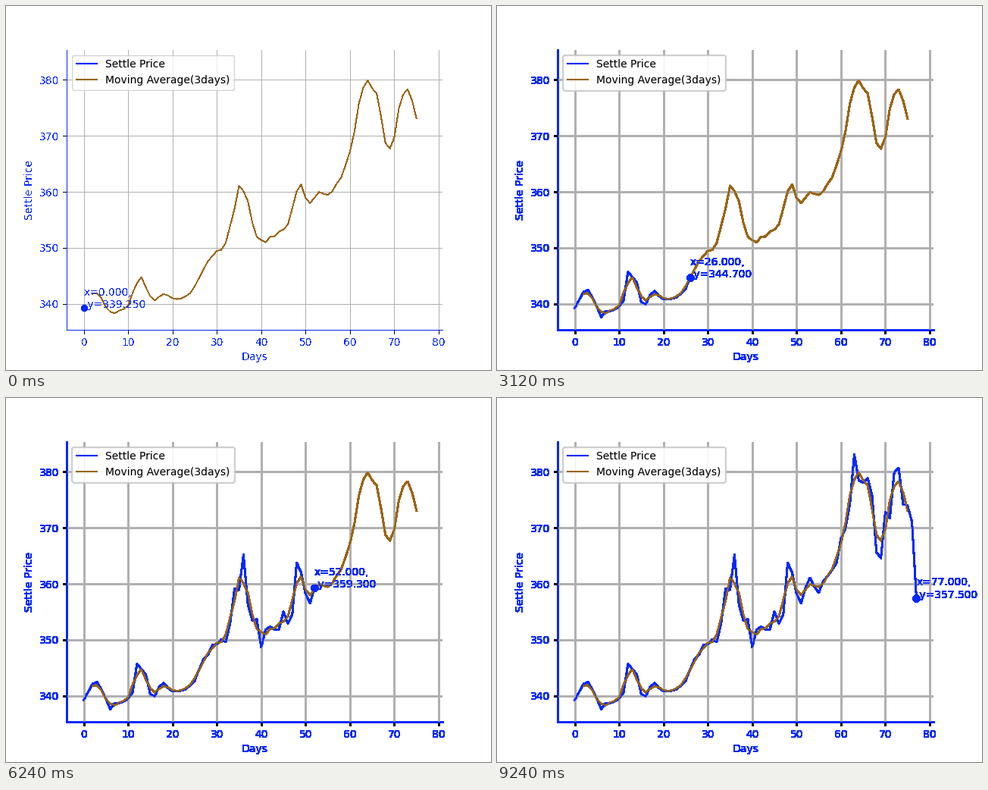
Recreate the animation shown at these times as a matplotlib script. Size 640 by 480 pixels, loop 9.36 s.

```python
import numpy as np
import matplotlib.pyplot as plt
from matplotlib.animation import FuncAnimation

BLUE = "#0028ff"
BROWN = "#996515"

price = np.array([
    339.25, 340.7, 342.15, 342.5, 341.1, 339.45, 337.62, 338.7, 338.7, 339.0,
    339.5, 340.6, 345.7, 344.8, 343.8, 340.3, 339.9, 341.6, 342.3, 341.4,
    340.8, 340.8, 340.95, 341.2, 341.9, 342.7, 344.7, 346.5, 347.3, 349.1,
    349.2, 350.1, 349.6, 353.0, 359.2, 358.92, 365.2, 356.3, 353.5, 353.7,
    348.7, 351.8, 352.4, 351.8, 351.9, 355.04, 352.9, 354.5, 363.8, 362.0,
    358.2, 356.5, 359.3, 361.1, 359.5, 358.4, 360.5, 361.4, 362.5, 363.74,
    368.1, 369.9, 374.2, 383.15, 378.5, 378.1, 378.9, 375.9, 365.66, 364.6,
    372.9, 371.7, 379.9, 380.7, 374.25, 374.0, 371.1, 357.5])
days = np.arange(len(price))
average = np.convolve(price, np.ones(3) / 3, "valid")  # centred on days 1..76

fig, ax = plt.subplots(figsize=(6.4, 4.8), dpi=100, facecolor="white")
ax.set_facecolor("none")
ax.set_xlim(-3.85, 80.85)
ax.set_ylim(335.34, 385.4)
ax.grid(True, color="#b0b0b0", linewidth=0.8)

line, = ax.plot([], [], color=BLUE, label="Settle Price")
ax.plot(days[2:76], average[1:75], color=BROWN, label="Moving Average(3days)")
dot, = ax.plot([], [], "o", color=BLUE)
note = ax.text(0, 0, "", color=BLUE)

ax.set_xlabel("Days", color=BLUE)
ax.set_ylabel("Settle Price", color=BLUE)
ax.tick_params(labelcolor=BLUE)
for side in ("left", "bottom"):
    ax.spines[side].set_color(BLUE)
for side in ("top", "right"):
    ax.spines[side].set_visible(False)
ax.legend(loc="upper left")


def one_bit_alpha(cutoff):
    """Make every pixel above the cutoff opaque and drop the rest."""
    def apply(image, dpi):
        out = np.rint(image * 255).astype(np.uint8)
        out[..., 3] = np.where(image[..., 3] > cutoff, 255, 0)
        return out, 0, 0
    return apply


crisp, heavy = one_bit_alpha(0.5), one_bit_alpha(0)


def update(i):
    ax.set_agg_filter(heavy if i else crisp)
    line.set_data(days[:i + 1], price[:i + 1])
    dot.set_data([days[i]], [price[i]])
    note.set_position((days[i], price[i]))
    note.set_text(f"x={days[i]:.3f},\n y={price[i]:.3f}")
    return line, dot, note


anim = FuncAnimation(fig, update, frames=len(price), interval=120,
                     repeat=True, repeat_delay=0, blit=False)
plt.show()
```
